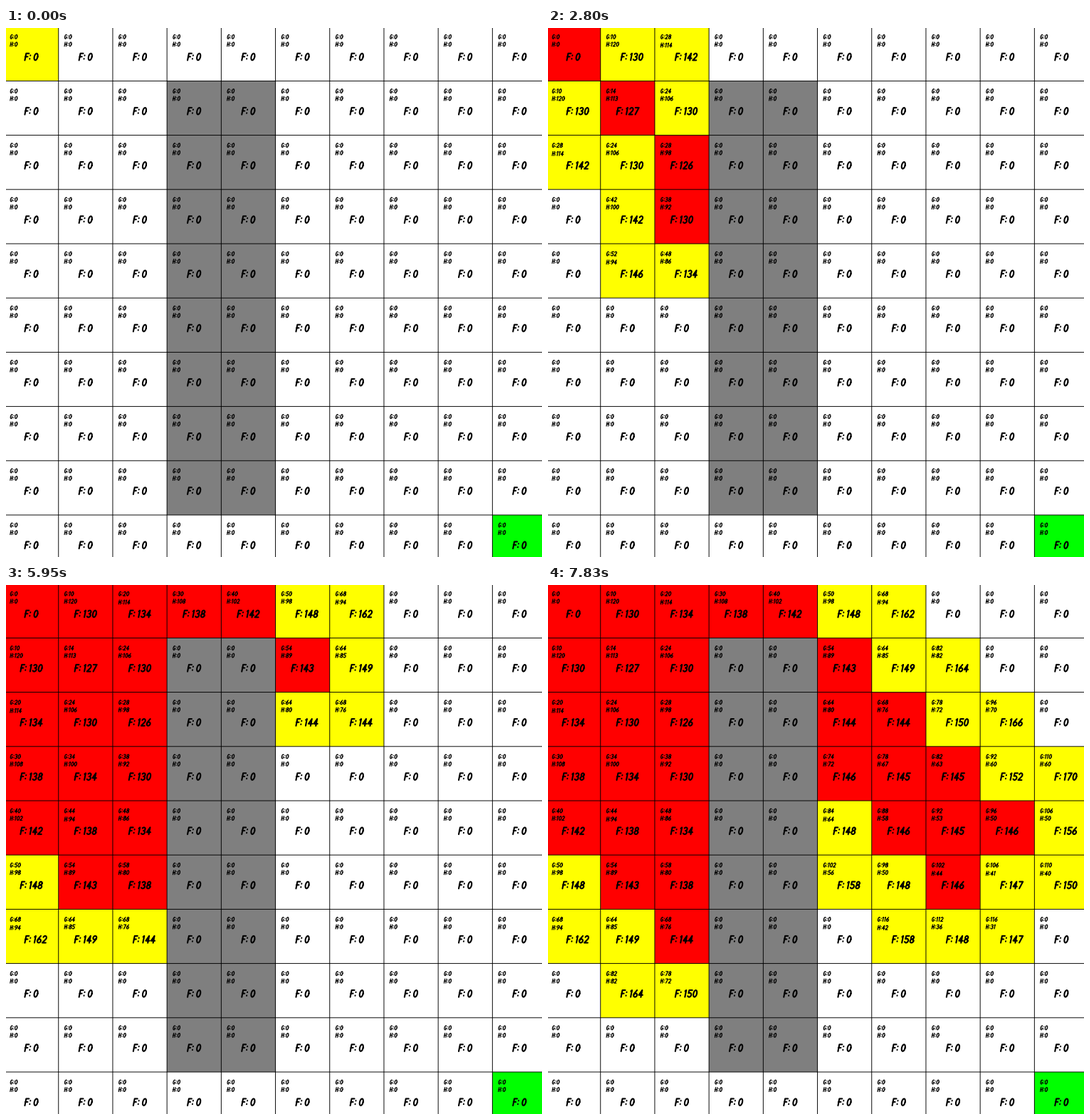
A matplotlib script for the animation above (8 s loop, 753 px wide and 743 px high).

```python
import math
from itertools import product

import numpy as np
import matplotlib.pyplot as plt
from matplotlib.animation import FuncAnimation
from matplotlib.collections import LineCollection, PolyCollection
from matplotlib.patches import PathPatch
from matplotlib.path import Path

W, H, DPI = 753, 743, 64
PX = 72 / DPI
LOOP, STEP = 8000, 20
N, PITCH = 10, 76.2
START, GOAL = (0, 0), (9, 9)
WALLS = set(product(range(1, 9), (3, 4)))
WHITE, GREY, YELLOW, RED, GREEN = "#ffffff", "#7f7f7f", "#ffff00", "#ff0000", "#00ff00"

# Moments at which the search advances; a few of them expand two cells.
TIMES = [270, 1740, 2340, 2800, 3130, 3460, 4010, 4080, 4150, 4420, 4620, 4820,
         5280, 5350, 5550, 5750, 5950, 6170, 6300, 6500, 6700, 6830, 7030,
         7230, 7430, 7630, 7830]
DOUBLE = {4010, 4080, 4150}


# ---- slanted comic lettering, drawn with strokes on a 12 unit cap height ----
def arc(cx, cy, rx, ry, a, b):
    t = np.radians(np.linspace(a, b, 13))
    return np.column_stack([cx + rx * np.cos(t), cy + ry * np.sin(t)])


def join(*parts):
    return np.vstack([np.atleast_2d(p) for p in parts])


SIX = join((4.6, 10.8), (1.7, 6.4), arc(3.5, 3.8, 2.4, 2.6, 160, 520))
GLYPHS = {
    "F": [join((1.2, 1.1), (1.2, 10.8), (5.2, 10.8)), join((1.2, 6.2), (4.2, 6.2))],
    "G": [join(arc(3.5, 6, 2.4, 4.8, 50, 325), (5.6, 5.4), (3.8, 5.4))],
    "H": [join((1.2, 1.1), (1.2, 10.9)), join((5.2, 1.1), (5.2, 10.9)),
          join((1.2, 6), (5.2, 6))],
    ":": [join((1.7, 3), (1.7, 3.4)), join((1.7, 7.8), (1.7, 8.2))],
    " ": [],
    "0": [arc(3.5, 6, 2.4, 4.8, 0, 360)],
    "1": [join((1, 9.4), (2.3, 10.8), (2.3, 1.2))],
    "2": [join(arc(3.3, 8, 2.3, 2.8, 160, -40), (1.1, 1.2), (6, 1.2))],
    "3": [join(arc(3.2, 8.5, 2.2, 2.3, 150, -90), arc(3.2, 3.7, 2.5, 2.5, 90, -150))],
    "4": [join((4.4, 1), (4.4, 10.9), (1, 4), (6.3, 4))],
    "5": [join((6, 10.8), (1.7, 10.8), (1.5, 6.6), arc(3.3, 4.1, 2.5, 2.9, 110, -150))],
    "6": [SIX],
    "7": [join((1, 10.8), (5.8, 10.8), (2.6, 1.2))],
    "8": [arc(3.5, 8.5, 2, 2.3, 0, 360), arc(3.5, 3.7, 2.4, 2.5, 0, 360)],
    "9": [np.array([7, 12]) - SIX],
}
ADVANCE = {"F": 6, "G": 7, "H": 7, ":": 3.8, " ": 2.6, "1": 4.8}
SLANT, PEN, SMALL = 0.2, 2.1, 0.6


def advance(ch):
    return ADVANCE.get(ch, 7.4)


def width(text):
    return sum(map(advance, text))


def write(text, x, base, size=1.0):
    strokes = []
    for ch in text:
        for pts in GLYPHS[ch]:
            px = x + size * (pts[:, 0] + SLANT * pts[:, 1])
            strokes.append(Path(np.column_stack([px, base - size * pts[:, 1]])))
        x += size * advance(ch)
    return strokes


# ---- A* search ----
class Cell:
    def __init__(self, pos):
        self.pos = pos
        self.g = self.h = 0
        self.centred = False
        self.colour = GREY if pos in WALLS else GREEN if pos == GOAL else WHITE

    @property
    def f(self):
        return self.g + self.h


def expand(cells):
    opened = [c for c in cells.values() if c.colour == YELLOW]
    cur = min(opened, key=lambda c: (c.f, c.h, -c.pos[0]))
    cur.colour, cur.centred = RED, True
    r, k = cur.pos
    for dr, dk in product((-1, 0, 1), repeat=2):
        cell = cells.get((r + dr, k + dk))
        if cell is None or cell.colour not in (WHITE, YELLOW):
            continue
        g = cur.g + (14 if dr and dk else 10)
        fresh = cell.colour == WHITE
        if fresh or g < cell.g:
            cell.g = g
            cell.h = int(10 * math.dist(cell.pos, GOAL))
            cell.colour, cell.centred = YELLOW, not fresh


def snapshot(cells):
    big, small = [], []
    for (r, k), c in cells.items():
        x, y = PITCH * k, PITCH * r
        total = f"F: {c.f}"
        # A label is only re-centred the second time its cell is touched.
        span = width(total if c.centred else "F: 0")
        big += write(total, x + 34.9 - span / 2, y + 46.5)
        small += write(f"G:{c.g}", x + 5, y + 15.9, SMALL)
        drop = 1.2 if "4" in str(c.h) else 0
        small += write(f"H:{c.h}", x + 5, y + 26.4 + drop, SMALL)
    return ([c.colour for c in cells.values()],
            Path.make_compound_path(*big), Path.make_compound_path(*small))


def run_search():
    cells = {pos: Cell(pos) for pos in product(range(N), repeat=2)}
    cells[START].colour = YELLOW
    states = [snapshot(cells)]
    for t in TIMES:
        for _ in range(2 if t in DOUBLE else 1):
            expand(cells)
        states.append(snapshot(cells))
    return states


STATES = run_search()

# ---- stage ----
fig = plt.figure(figsize=(W / DPI, H / DPI), dpi=DPI, facecolor="white")
ax = fig.add_axes([0, 0, 1, 1])
ax.set_xlim(0, W)
ax.set_ylim(H, 0)
ax.axis("off")

# Grid lines fall between whole pixels, so they are drawn unsnapped.
line_x = PITCH * np.arange(N + 1) - 2.45
line_y = PITCH * np.arange(N + 1) - 1.8
xs, ys = np.round(line_x), np.round(line_y)
boxes = [[(xs[k], ys[r]), (xs[k + 1], ys[r]), (xs[k + 1], ys[r + 1]), (xs[k], ys[r + 1])]
         for r, k in product(range(N), repeat=2)]
tiles = PolyCollection(boxes, linewidths=0, edgecolors="none", antialiaseds=False)
ax.add_collection(tiles, autolim=False)
grid = [[(x, 0), (x, H)] for x in line_x] + [[(0, y), (W, y)] for y in line_y]
ax.add_collection(LineCollection(grid, colors="black", linewidths=0.95 * PX,
                                 snap=False), autolim=False)


def ink(path, size):
    patch = PathPatch(path, fill=False, edgecolor="black", snap=False,
                      linewidth=PEN * size * PX, capstyle="round", joinstyle="round")
    return ax.add_patch(patch)


big_ink = ink(STATES[0][1], 1)
small_ink = ink(STATES[0][2], SMALL)
big_ink.set_zorder(3)
small_ink.set_zorder(3)


def draw(i):
    now = i * STEP + STEP / 2
    colours, big, small = STATES[np.searchsorted(TIMES, now, side="right")]
    tiles.set_facecolor(colours)
    big_ink.set_path(big)
    small_ink.set_path(small)
    return tiles, big_ink, small_ink


anim = FuncAnimation(fig, draw, frames=LOOP // STEP, interval=STEP,
                     init_func=lambda: draw(0), repeat=True, repeat_delay=0)
plt.show()
```
